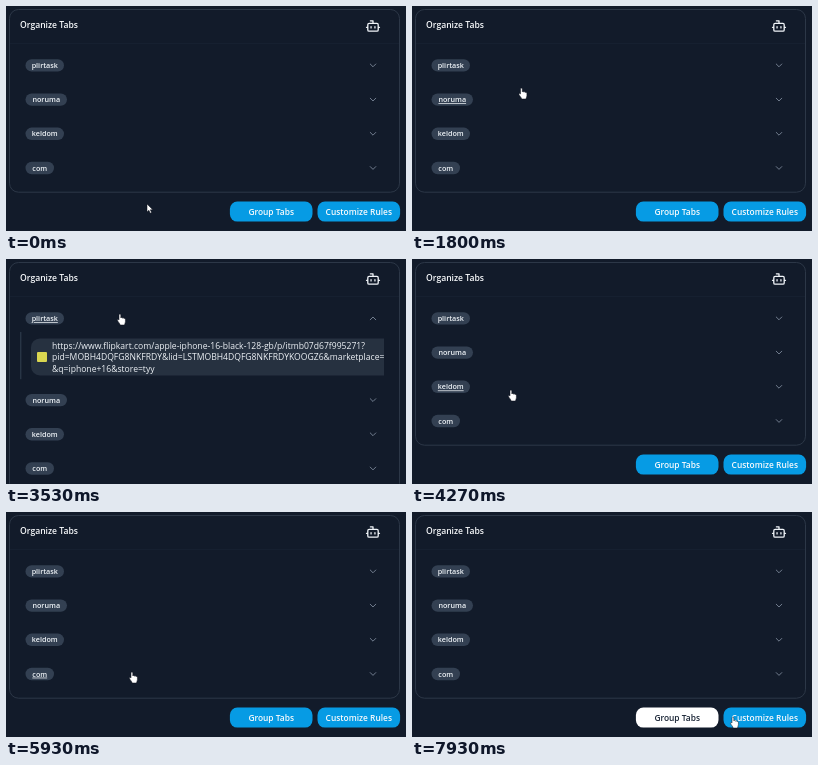
Recreate the animation shown at these times as an HTML page. Size 400 px wide and 225 px high, loop 8 s.

```html
<!DOCTYPE html>
<html lang="en">
<head>
<meta charset="utf-8">
<title>Organize Tabs</title>
<style>
  html, body { margin: 0; width: 100%; height: 100%; overflow: hidden; background: #121b2a; }
  svg { display: block; width: 100%; height: 100%; font-family: "Open Sans", "Noto Sans", sans-serif; }
  .title, .button { font-size: 8.6px; font-weight: 600; fill: #f8fafc; }
  .button { font-size: 8.4px; text-anchor: middle; }
  .label { font-size: 7.2px; font-weight: 600; fill: #f1f5f9; text-anchor: middle; }
  .url { font-size: 8.6px; fill: #eef2f6; white-space: pre; }
  .icon { fill: none; stroke-linecap: round; stroke-linejoin: round; stroke-width: 2; }
</style>
</head>
<body>
<svg id="stage" viewBox="0 0 400 225"></svg>
<script>
const LOOP = 8000;
const TOGGLE = 300;
const stage = document.getElementById('stage');

const rows = [
  { label: 'plirtask', width: 38.5, open: 2584, close: 3550, height: 47.5, items: [
    { top: 20, height: 37, icon: '#d9d650', square: true, iconY: 38.5, lines: [
      'https://www.flipkart.com/apple-iphone-16-black-128-gb/p/itmb07d67f995271?',
      'pid=MOBH4DQFG8NKFRDY&lid=LSTMOBH4DQFG8NKFRDYKOOGZ6&marketplace=FLIPKART',
      '&q=iphone+16&store=tyy'] }] },
  { label: 'noruma', width: 41.5 },
  { label: 'keldom', width: 38.5, open: 4450, close: 5456, height: 74, items: [
    { top: 20, height: 37, icon: '#c9447a', iconY: 38.2, lines: [
      'https://www.myntra.com/?',
      'utm_source=dms_google&utm_medium=searchbrand_cpc&utm_campaign=dms_google',
      'yxNZl25lSoKrp_G51skV3LfJtRoCoZsQAvD_BwE'] },
    { top: 63.5, height: 24, icon: '#c9447a', iconY: 71.5, lines: [
      'https://www.myntra.com/accessories?',
      'f=Brand%3ACaprese%3A%3ACategories%3AClutches%2CHandbags%2CWallets%3A%3A'] }] },
  { label: 'com', width: 28.5 }
];

// time, x, y of the pointer tip
const path = [
  [0, 141, 198], [900, 130, 158], [1800, 109.5, 82], [2200, 112, 46], [2500, 114, 55],
  [3700, 114, 55], [4150, 99, 131], [5500, 99, 131], [5850, 126, 160], [6250, 126, 160],
  [7250, 255, 203], [7830, 292, 206], [7930, 321, 205], [8000, 321, 205]
];

function el(parent, tag, attrs = {}, text) {
  const node = document.createElementNS('http://www.w3.org/2000/svg', tag);
  for (const key in attrs) node.setAttribute(key, attrs[key]);
  if (text) node.textContent = text;
  return parent.appendChild(node);
}

const clamp = v => Math.max(0, Math.min(1, v));
const ramp = (t, start, length) => clamp((t - start) / length);
const mix = (a, b, k) => a.map((v, i) => Math.round(v + (b[i] - v) * k));
const rgb = c => `rgb(${c.join(',')})`;
const move = (node, x, y) => node.setAttribute('transform', `translate(${x} ${y})`);

function bezier(x1, y1, x2, y2) {
  const at = (a, b, s) => 3 * a * s * (1 - s) ** 2 + 3 * b * s * s * (1 - s) + s ** 3;
  return x => {
    let lo = 0, hi = 1;
    for (let i = 0; i < 24; i++) {
      const mid = (lo + hi) / 2;
      if (at(x1, x2, mid) < x) lo = mid; else hi = mid;
    }
    return x <= 0 ? 0 : x >= 1 ? 1 : at(y1, y2, lo);
  };
}
const easeOut = bezier(0, 0, 0.58, 1);
const ease = bezier(0.25, 0.1, 0.25, 1);

function addItem(panel, item) {
  el(panel, 'rect', { x: 25, y: item.top, width: 380, height: item.height, rx: 9, fill: '#263140' });
  if (item.square) el(panel, 'rect', { x: 31, y: item.iconY - 5, width: 10, height: 10, rx: 1, fill: item.icon });
  else el(panel, 'circle', { cx: 36, cy: item.iconY, r: 3.3, fill: item.icon });
  item.lines.forEach((line, i) =>
    el(panel, 'text', { class: 'url', x: 46, y: item.top + 10.4 + i * 11.4 }, line));
}

function addRow(row, i) {
  row.y = 59.4 + i * 34.2;
  row.node = el(stage, 'g');
  el(row.node, 'rect', { x: 19.5, y: -6.2, width: row.width, height: 12.4, rx: 6.2, fill: '#334052' });
  row.text = el(row.node, 'text', { class: 'label', x: 19.5 + row.width / 2, y: 2.6 }, row.label);
  row.chevron = el(row.node, 'path', { class: 'icon', d: 'M-6-3 0 3 6-3', stroke: '#7b8798' });
  if (!row.items) return;
  const clip = el(row.node, 'clipPath', { id: 'clip' + i });
  row.clip = el(clip, 'rect', { x: 0, y: 13.5, width: 378, height: 0 });
  const panel = el(row.node, 'g', { 'clip-path': `url(#clip${i})` });
  el(panel, 'path', { d: `M14.8 13.5v${row.height}`, stroke: '#334052' });
  row.items.forEach(item => addItem(panel, item));
}

function addButton(parent, x, label) {
  const box = el(parent, 'rect', { x, y: 195.6, width: 82.6, height: 20, rx: 7.5, fill: '#069be4' });
  const text = el(parent, 'text', { class: 'button', x: x + 41.3, y: 209 }, label);
  return { box, text };
}

const card = el(stage, 'rect', { x: 3.5, y: 3.5, width: 390, rx: 9, fill: 'none', stroke: '#2c3747' });
el(stage, 'path', { d: 'M4 37.5h389', stroke: '#162030' });
el(stage, 'text', { class: 'title', x: 14, y: 22.3 }, 'Organize Tabs');
el(stage, 'path', {
  class: 'icon', stroke: '#f1f5f9', transform: 'translate(359.2 12.2) scale(.65)',
  d: 'M12 8V4H8M6 8h12a2 2 0 0 1 2 2v8a2 2 0 0 1-2 2H6a2 2 0 0 1-2-2v-8a2 2 0 0 1 2-2zM2 14h2M20 14h2M15 13v2M9 13v2'
});
rows.forEach(addRow);
const footer = el(stage, 'g');
const group = addButton(footer, 223.9, 'Group Tabs');
addButton(footer, 311.5, 'Customize Rules');

const arrow = el(stage, 'path', {
  d: 'M0 0v8l1.9-1.7 1.3 2.9 1.4-.6-1.3-2.8h2.5z', fill: '#fff', stroke: '#0a0f18', 'stroke-width': 0.5
});
const hand = el(stage, 'path', {
  d: 'M-1 1C-1-.2.8-.2.8 1v3c.3-.7 1.5-.6 1.6.2.4-.6 1.5-.4 1.6.4.5-.4 1.4-.1 1.4.8v2.3c0 1.2-.7 1.8-.9 3.3H.2C-.1 9.5-1.5 8.3-2.4 6.7c-.6-1 .5-1.6 1.4-.7z',
  fill: '#fff', stroke: '#0a0f18', 'stroke-width': 0.5
});

function pointerAt(t) {
  const i = Math.max(1, path.findIndex(p => p[0] >= t));
  const [a, b] = [path[i - 1], path[i]];
  const p = ramp(t, a[0], b[0] - a[0]);
  const k = p * p * (3 - 2 * p);
  return [a[1] + (b[1] - a[1]) * k, a[2] + (b[2] - a[2]) * k];
}

function draw(t) {
  const [px, py] = pointerAt(t);
  let shift = 0, overRow = false;
  for (const row of rows) {
    const y = row.y + shift;
    const hover = Math.abs(py - y) < 17 && px > 19 && px < 378;
    overRow = overRow || hover;
    move(row.node, 0, y);
    row.text.setAttribute('text-decoration', hover ? 'underline' : 'none');
    let turn = 0;
    if (row.items) {
      const opening = ramp(t, row.open, TOGGLE), closing = ramp(t, row.close, TOGGLE);
      const height = row.height * (easeOut(opening) - easeOut(closing));
      turn = 180 * (ease(opening) - ease(closing));
      row.clip.setAttribute('height', height);
      shift += height;
    }
    row.chevron.setAttribute('transform', `translate(367 0) rotate(${turn}) scale(.46)`);
  }
  card.setAttribute('height', 182.7 + shift);
  move(footer, 0, shift);

  const lit = ease(ramp(t, 7080, 150));
  group.box.setAttribute('fill', rgb(mix([6, 155, 228], [255, 255, 255], lit)));
  group.text.style.fill = rgb(mix([248, 250, 252], [24, 35, 52], lit));

  const overButton = py > 196 && px > 224;
  const pointing = overRow || overButton;
  arrow.setAttribute('visibility', pointing ? 'hidden' : 'visible');
  hand.setAttribute('visibility', pointing ? 'visible' : 'hidden');
  move(pointing ? hand : arrow, px, py);
}

const start = performance.now();
function tick() {
  draw((performance.now() - start) % LOOP);
  requestAnimationFrame(tick);
}
tick();
</script>
</body>
</html>
```
